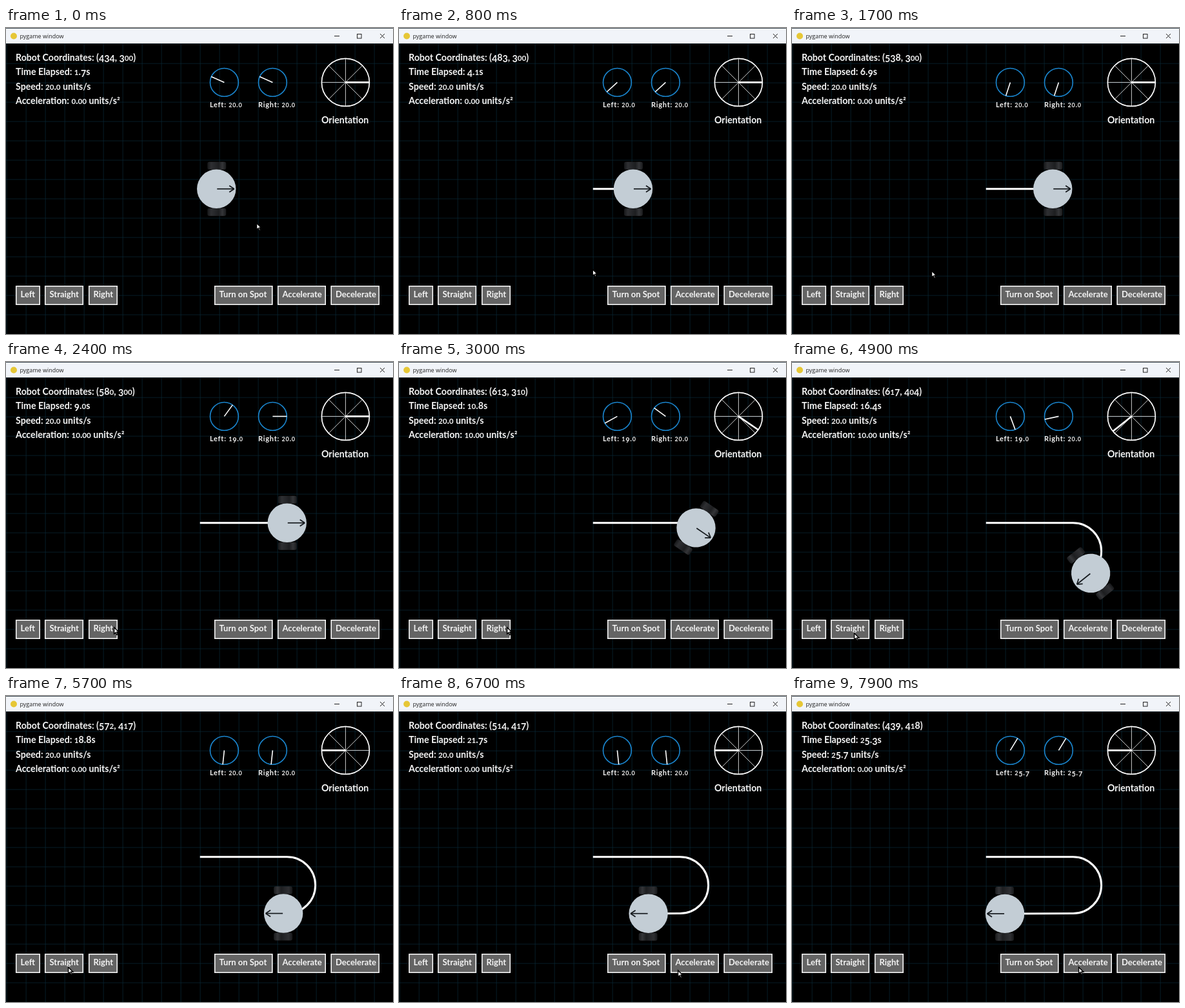
Animation, 600 px wide and 475 px high, one loop 8000 ms. Source, as an HTML page with a canvas:

```html
<!DOCTYPE html>
<html lang="en">
<head>
<meta charset="utf-8">
<title>pygame window</title>
<style>
html, body { margin: 0; width: 100%; height: 100%; overflow: hidden; background: #000; }
canvas { display: block; }
</style>
</head>
<body>
<canvas id="stage" width="600" height="475"></canvas>
<script>
const ctx = document.getElementById('stage').getContext('2d');
const LOOP = 8000, STEP = 100, UNIT = 0.75, LEFT = 0.75, TOP = 24.75;
const TURN_START = 9, TURN_END = 9 + 3 * Math.PI, BOOST_START = 24.1;
const RADIUS = 58.5, CORNER = 580;

// [ms, simulated seconds]
const clock = [[0, 1.7], [1700, 6.9], [3000, 10.8], [4100, 14], [5700, 18.8], [6700, 21.7], [7900, 25.3]];
// [ms, x, y]
const pointer = [[0, 389, 303], [300, 389, 303], [1200, 230, 432], [1700, 217, 377], [2200, 168, 412],
  [3000, 168, 412], [3700, 112, 418], [4100, 110, 419], [4500, 97, 421], [5700, 97, 421], [6300, 500, 415],
  [6700, 433, 426], [6900, 436, 434], [7200, 445, 421], [8000, 445, 421]];
const buttons = [['Left', 15, 38], ['Straight', 60, 60], ['Right', 128, 45],
  ['Turn on Spot', 323, 90.5], ['Accelerate', 421, 75], ['Decelerate', 503.5, 75.5]];

function track(keys, t) {
  let i = 1;
  while (i < keys.length - 1 && keys[i][0] < t) i++;
  const a = keys[i - 1], b = keys[i];
  const k = Math.min(1, (t - a[0]) / (b[0] - a[0]));
  return a.slice(1).map((v, j) => v + (b[j + 1] - v) * k);
}

function robotAt(s) {
  if (s < TURN_START) return { x: 400 + 20 * s, y: 300, heading: 0, speed: 20, left: 20, acc: 0 };
  if (s < TURN_END) {
    const h = (s - TURN_START) / 3;
    return { x: CORNER + RADIUS * Math.sin(h), y: 300 + RADIUS * (1 - Math.cos(h)),
      heading: h, speed: 20, left: 19, acc: 10 };
  }
  const boost = Math.max(0, s - BOOST_START);
  const run = 20 * (s - TURN_END) + 2.375 * boost * boost;
  const speed = 20 + 4.75 * boost;
  return { x: CORNER - run, y: 300 + 2 * RADIUS + run * 0.004, heading: Math.PI, speed, left: speed, acc: 0 };
}

function line(x1, y1, x2, y2, color, width) {
  ctx.strokeStyle = color;
  ctx.lineWidth = width;
  ctx.beginPath();
  ctx.moveTo(x1, y1);
  ctx.lineTo(x2, y2);
  ctx.stroke();
}

function ray(x, y, length, angle, width) {
  line(x, y, x + length * Math.cos(angle), y + length * Math.sin(angle), '#fff', width);
}

function circle(x, y, r, fill, stroke, width) {
  ctx.beginPath();
  ctx.arc(x, y, r, 0, 7);
  if (fill) { ctx.fillStyle = fill; ctx.fill(); }
  if (stroke) { ctx.strokeStyle = stroke; ctx.lineWidth = width; ctx.stroke(); }
}

// Old-style figures: 0-2 at x-height, 3 4 5 7 9 descending.
function label(text, x, y, size, gap = 0) {
  ctx.fillStyle = '#f4f4f4';
  ctx.letterSpacing = gap + 'px';
  for (const part of text.match(/\d|\D+/g)) {
    const small = /[012]/.test(part), low = /[34579]/.test(part);
    ctx.font = `700 ${small ? size * 0.82 : size}px Lato, sans-serif`;
    ctx.fillText(part, x, y + (low ? size * 0.19 : 0));
    x += ctx.measureText(part).width;
  }
  ctx.letterSpacing = '0px';
}

function titleBar() {
  ctx.fillStyle = '#f1f4f9';
  ctx.fillRect(0, 0, 600, 24);
  ctx.fillStyle = '#1d2a33';
  ctx.fillRect(0, 0, 600, 0.8);
  circle(12, 12.5, 5, '#e6c736');
  ctx.fillStyle = '#222';
  ctx.font = '9px "Open Sans", sans-serif';
  ctx.fillText('pygame window', 21.4, 16);
  line(509, 12.5, 517, 12.5, '#222', 1);
  ctx.strokeRect(544.5, 9.5, 6.5, 6.5);
  line(580, 9, 587, 16, '#222', 1);
  line(587, 9, 580, 16, '#222', 1);
}

function grid() {
  const half = UNIT / 2;
  for (let x = LEFT + half; x < 600; x += 30) line(x, 24, x, 475, '#0a2735', UNIT);
  for (let y = TOP + half; y < 475; y += 30) line(0, y, 600, y, '#0a2735', UNIT);
}

function wheelDial(x, name, speed, s) {
  circle(x, 84.4, 21.9, null, '#1a86cf', 1.6);
  ray(x, 84.4, 22, speed * 6 * s * Math.PI / 180, 1.6);
  label(`${name}: ${speed.toFixed(1)}`, x - 22.5, 123.3, 11, 0.75);
}

function compass(heading) {
  for (let i = 0; i < 8; i++) ray(526.4, 84.4, 37, i * Math.PI / 4, 0.8);
  circle(526.4, 84.4, 37, null, '#fff', 1.7);
  ray(526.4, 84.4, 37, heading, 2.6);
  label('Orientation', 489, 148.4, 14.2);
}

function trail(r) {
  ctx.save();
  ctx.translate(LEFT, TOP);
  ctx.scale(UNIT, UNIT);
  ctx.beginPath();
  ctx.moveTo(400, 300);
  if (r.heading) ctx.arc(CORNER, 300 + RADIUS, RADIUS, -Math.PI / 2, r.heading - Math.PI / 2);
  ctx.lineTo(r.x, r.y);
  ctx.strokeStyle = '#fff';
  ctx.lineWidth = 4;
  ctx.stroke();
  ctx.restore();
}

function robot(r) {
  ctx.save();
  ctx.translate(LEFT + r.x * UNIT, TOP + r.y * UNIT);
  ctx.rotate(r.heading);
  const rubber = ctx.createLinearGradient(-14, 0, 15, 0);
  ['#161719', '#2e2f32', '#26272a', '#1d1e20', '#343538', '#1a1b1d']
    .forEach((c, i) => rubber.addColorStop(i / 5, c));
  ctx.fillStyle = rubber;
  for (const y of [-42, 30]) {
    ctx.beginPath();
    ctx.roundRect(-14, y, 29, 12, 3);
    ctx.fill();
  }
  circle(0, 0, 30.2, '#c3cdd5');
  line(1, 0, 27, 0, '#15191d', 1.7);
  line(20, -5, 27.5, 0, '#15191d', 1.7);
  line(20, 5, 27.5, 0, '#15191d', 1.7);
  ctx.restore();
}

function button([text, x, w]) {
  ctx.fillStyle = '#646464';
  ctx.fillRect(x, 400, w, 30);
  ctx.strokeStyle = '#fff';
  ctx.lineWidth = 1.5;
  ctx.strokeRect(x + 0.75, 400.75, w - 1.5, 28.5);
  label(text, x + 7.5, 418, 13);
}

function cursor(x, y) {
  const shape = new Path2D('M0 0V10L2.4 7.9L4.1 11.6L5.8 10.8L4.2 7.3H7.3Z');
  ctx.save();
  ctx.translate(x - 0.4, y);
  ctx.strokeStyle = '#000';
  ctx.lineWidth = 1.4;
  ctx.fillStyle = '#fff';
  ctx.fill(shape);
  ctx.stroke(shape);
  ctx.restore();
}

function draw(now) {
  const t = Math.floor(now % LOOP / STEP) * STEP;
  const [s] = track(clock, t);
  const r = robotAt(s);
  ctx.fillStyle = '#000';
  ctx.fillRect(0, 0, 600, 475);
  grid();
  titleBar();
  trail(r);
  robot(r);
  [`Robot Coordinates: (${Math.round(r.x)}, ${Math.round(r.y)})`,
    `Time Elapsed: ${s.toFixed(1)}s`,
    `Speed: ${r.speed.toFixed(1)} units/s`,
    `Acceleration: ${r.acc.toFixed(2)} units/s²`
  ].forEach((text, i) => label(text, 15, 50.5 + 22.5 * i, 14.2));
  wheelDial(338.4, 'Left', r.left, s);
  wheelDial(413.4, 'Right', r.speed, s);
  compass(r.heading);
  buttons.forEach(button);
  cursor(...track(pointer, t));
  requestAnimationFrame(draw);
}
requestAnimationFrame(draw);
</script>
</body>
</html>
```
